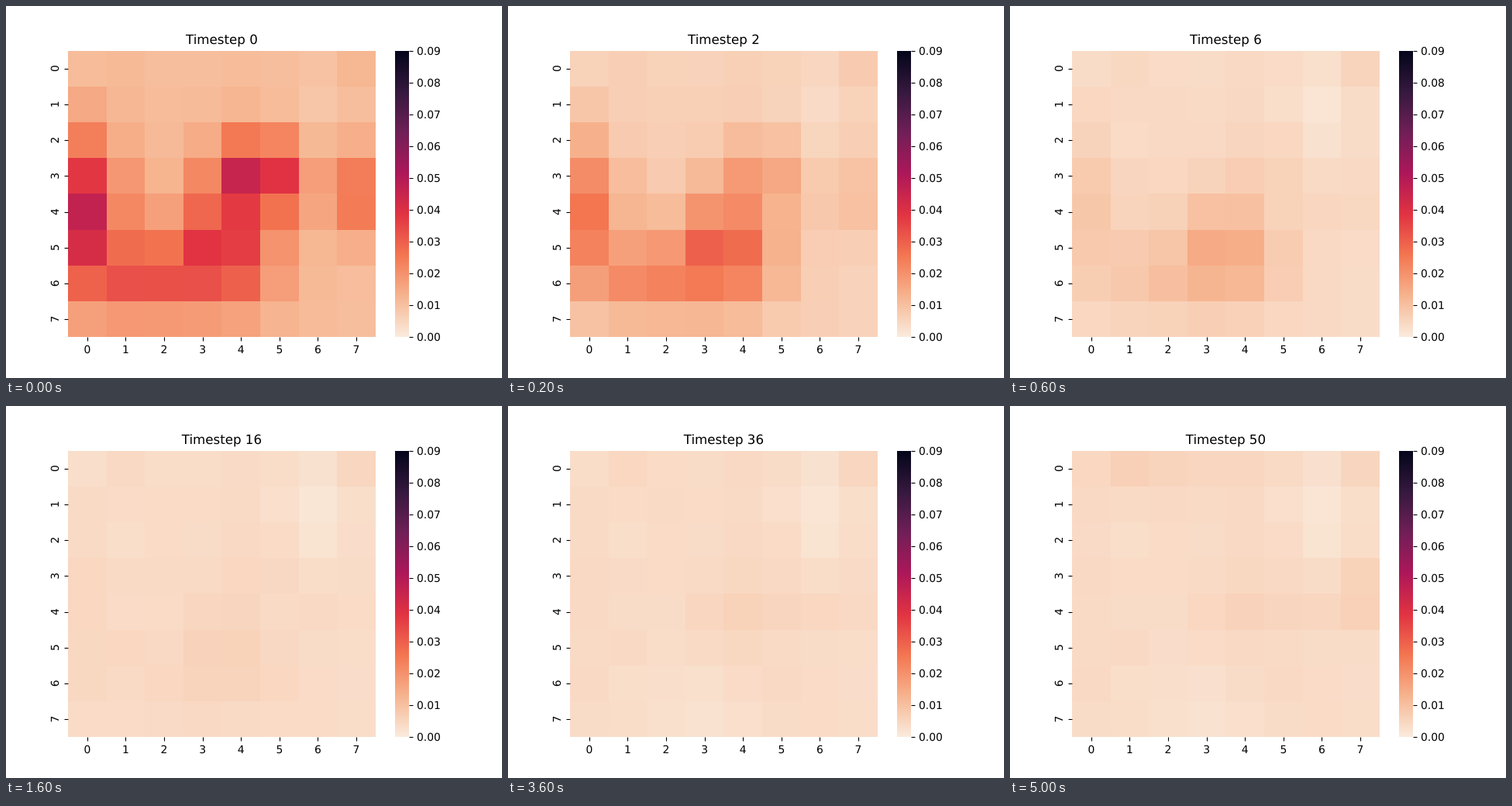
These frames come from a looping animation (640x480 px, 5100 ms). An HTML page:

```html
<!DOCTYPE html>
<html lang="en">
<head>
<meta charset="utf-8">
<title>Heatmap</title>
<style>
  html, body { margin: 0; width: 100%; height: 100%; overflow: hidden; background: #fff; }
  svg { display: block; width: 640px; height: 480px; }
  text {
    font: 13.89px "DejaVu Sans", sans-serif; fill: #000;
    text-anchor: middle; text-rendering: geometricPrecision;
  }
  .title { font-size: 16.67px; }
  .bar { text-anchor: start; }
  rect { shape-rendering: crispEdges; }
  path { stroke: #000; stroke-width: 1.11; }
</style>
</head>
<body>
<svg id="plot" viewBox="0 0 640 480"></svg>
<script>
const STEP = 100, STEPS = 51, N = 8;
const LEFT = 80, TOP = 57.6, CELL_W = 49.6, CELL_H = 46.2, BOTTOM = 427.2;

// Values are in thousandths. Every cell starts in a haze that clears to the base.
const BASE = 3.6, HAZE = 7.2, HAZE_LIFE = 1.9, GRAIN = .6, MAX = 90;

// Soft spots of heat; each has cooled to half after `life` steps.
const spots = [
  { row: 4.1, col: 0, tall: 2.1, wide: .9, heat: 35, life: 2.2 },
  { row: 3, col: 4.4, tall: 1.1, wide: 1.15, heat: 35, life: 1.3 },
  { row: 5.2, col: 3.4, tall: 1.5, wide: 1.4, heat: 30, life: 5 },
  { row: 6, col: 1.4, tall: 1, wide: 1, heat: 20, life: 3.2 },
  { row: 3.5, col: 7, tall: 1.2, wide: .7, heat: 16, life: 1.2 },
  { row: 0, col: 7, tall: .6, wide: .6, heat: 1.5, life: Infinity },
  { row: 1, col: 6.1, tall: 1.3, wide: .9, heat: -2.2, life: Infinity }
];
// Faint changes that fade in between two steps.
const drifts = [
  { row: 4, col: 4.2, tall: .7, wide: 1.5, heat: 2.2, from: 10, to: 36 },
  { row: 6.6, col: 2.9, tall: .9, wide: 1.2, heat: -1.8, from: 16, to: 36 },
  { row: 0, col: 1.5, tall: .7, wide: 3, heat: 2.2, from: 30, to: 50 },
  { row: 3.5, col: 7, tall: .9, wide: .7, heat: 3.2, from: 30, to: 50 }
];

// Colours at even steps along the scale.
const scale = [
  "#faebdd", "#f6b48f", "#f37651", "#e13342", "#ad1759", "#701f57", "#35193e", "#03051a"
];

const mix = (a, b, p) => a + (b - a) * p;
const clamp = p => Math.min(1, Math.max(0, p));
const smooth = p => p * p * (3 - 2 * p);
const rgb = hex => [1, 3, 5].map(i => parseInt(hex.slice(i, i + 2), 16));

let seed = 7;
function random() {
  seed = (seed * 16807) % 2147483647;
  return seed / 2147483647;
}

function colour(value) {
  const pos = clamp(value / MAX) * (scale.length - 1);
  const i = Math.min(Math.floor(pos), scale.length - 2);
  const a = rgb(scale[i]), b = rgb(scale[i + 1]);
  return `rgb(${a.map((v, k) => Math.round(mix(v, b[k], pos - i)))})`;
}

function glow(s, row, col) {
  return s.heat * Math.exp(-(((row - s.row) / s.tall) ** 2) - ((col - s.col) / s.wide) ** 2);
}

function valueAt({ row, col, grain }, step) {
  let value = BASE + grain + HAZE * Math.exp(-step / HAZE_LIFE);
  for (const s of spots) value += glow(s, row, col) / (1 + (step / s.life) ** 2);
  for (const d of drifts) {
    value += glow(d, row, col) * smooth(clamp((step - d.from) / (d.to - d.from)));
  }
  return value;
}

const svg = document.getElementById("plot");
function add(tag, attrs, parent = svg) {
  const el = document.createElementNS("http://www.w3.org/2000/svg", tag);
  for (const k in attrs) el.setAttribute(k, attrs[k]);
  return parent.appendChild(el);
}
function label(text, attrs) {
  const el = add("text", attrs);
  el.textContent = text;
  return el;
}
const snap = v => Math.round(v) + .5;
const edgeX = col => Math.round(LEFT + col * CELL_W);
const edgeY = row => Math.round(TOP + row * CELL_H);

const cells = [];
for (let row = 0; row < N; row++) {
  for (let col = 0; col < N; col++) {
    const x = edgeX(col), y = edgeY(row);
    const rect = add("rect", { x, y, width: edgeX(col + 1) - x, height: edgeY(row + 1) - y });
    cells.push({ row, col, rect, grain: (random() * 2 - 1) * GRAIN });
  }
}

for (let i = 0; i < N; i++) {
  const x = LEFT + (i + .5) * CELL_W, y = TOP + (i + .5) * CELL_H;
  add("path", { d: `M${snap(x)} 427.5v5` });
  label(i, { x, y: 448 });
  add("path", { d: `M80.5 ${snap(y)}h-5` });
  label(i, { transform: `translate(67.5 ${y}) rotate(-90)` });
}

const ramp = add("linearGradient", { id: "ramp", x1: 0, y1: 1, x2: 0, y2: 0 });
scale.forEach((c, i) => add("stop", { offset: i / (scale.length - 1), "stop-color": c }, ramp));
add("rect", { x: 502, y: 58, width: 18, height: 369, fill: "url(#ramp)" });
for (let i = 0; i <= 9; i++) {
  const y = BOTTOM - i * (BOTTOM - TOP) / 9;
  add("path", { d: `M520.5 ${snap(y)}h5` });
  label((i / 100).toFixed(2), { x: 530, y: Math.round(y + 5), class: "bar" });
}

const title = label("", { x: 278.4, y: 49, class: "title" });

let shown = -1;
function draw(now) {
  const step = Math.floor(now / STEP) % STEPS;
  if (step !== shown) {
    shown = step;
    title.textContent = "Timestep " + step;
    for (const cell of cells) cell.rect.setAttribute("fill", colour(valueAt(cell, step)));
  }
  requestAnimationFrame(() => draw(performance.now() - start));
}
const start = performance.now();
draw(0);
</script>
</body>
</html>
```
